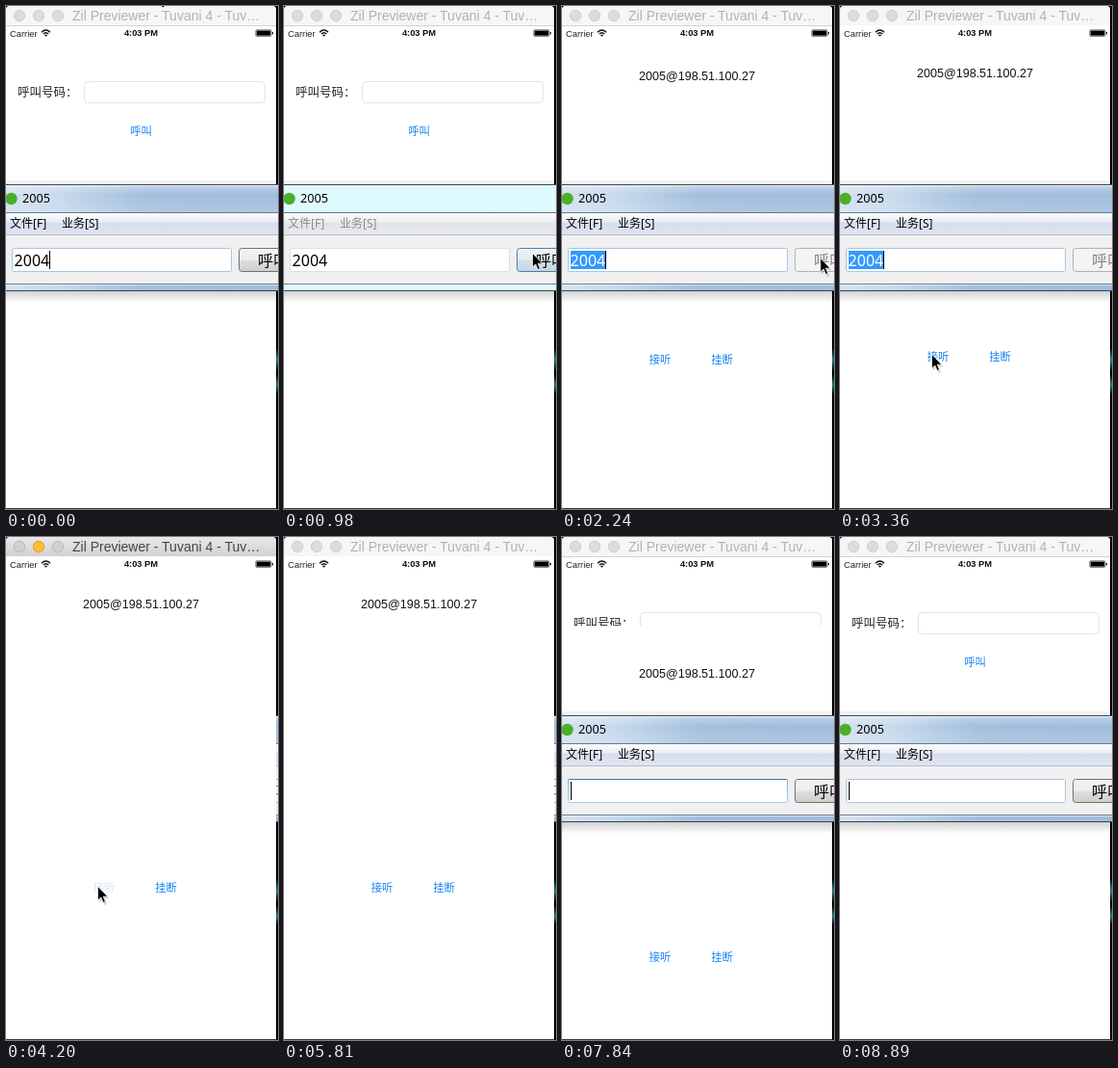
An HTML page for the animation above (9.1 s loop, 283 px wide and 522 px high).

```html
<!DOCTYPE html>
<html lang="zh-CN">
<head>
<meta charset="utf-8">
<title>Call demo</title>
<style>
html, body { margin: 0; width: 100%; height: 100%; overflow: hidden; background: #000; }
svg { display: block; }
text { white-space: pre; }
.la { font-family: "Liberation Sans", Arial, sans-serif; }
.cn { font-family: "Noto Sans CJK SC", "Noto Sans CJK", sans-serif; }
.ui { font-family: "Noto Sans", "Noto Sans CJK SC", "Noto Sans CJK", sans-serif; }
.link { font-size: 11.3px; fill: #1482f2; }
</style>
</head>
<body>
<svg width="283" height="522" viewBox="0 0 283 522">
  <defs>
    <linearGradient id="barOn" x2="0" y2="1"><stop stop-color="#e9e9e9"/><stop offset="1" stop-color="#d0d0d0"/></linearGradient>
    <linearGradient id="aero"><stop stop-color="#d3e2f1"/><stop offset=".2" stop-color="#c6d9ec"/><stop offset=".5" stop-color="#a3bfdd"/><stop offset="1" stop-color="#a0bddc"/></linearGradient>
    <linearGradient id="sheen" x2="0" y2="1"><stop stop-color="#fff" stop-opacity=".35"/><stop offset=".35" stop-color="#fff" stop-opacity="0"/><stop offset="1" stop-color="#fff" stop-opacity=".15"/></linearGradient>
    <linearGradient id="menu" x2="0" y2="1"><stop stop-color="#fcfdfe"/><stop offset=".42" stop-color="#e8edf6"/><stop offset=".45" stop-color="#d5dcec"/><stop offset="1" stop-color="#dfe5f2"/></linearGradient>
    <linearGradient id="menuOff" x2="0" y2="1"><stop stop-color="#fafbfc"/><stop offset=".42" stop-color="#eceef2"/><stop offset=".45" stop-color="#e0e3e9"/><stop offset="1" stop-color="#e8eaee"/></linearGradient>
    <linearGradient id="btn" x2="0" y2="1"><stop stop-color="#f3f3f3"/><stop offset=".5" stop-color="#ebebeb"/><stop offset=".51" stop-color="#dddddd"/><stop offset="1" stop-color="#cfcfcf"/></linearGradient>
    <linearGradient id="btnHot" x2="0" y2="1"><stop stop-color="#eef4f8"/><stop offset=".5" stop-color="#e2ebf1"/><stop offset=".51" stop-color="#d2dfe8"/><stop offset="1" stop-color="#c6d6e2"/></linearGradient>
    <linearGradient id="focus" x2="0" y2="1"><stop stop-color="#3d7bad"/><stop offset=".1" stop-color="#8db6d6"/><stop offset="1" stop-color="#a9cbe5"/></linearGradient>
    <linearGradient id="shade" x2="0" y2="1"><stop stop-color="#000" stop-opacity=".18"/><stop offset="1" stop-color="#000" stop-opacity="0"/></linearGradient>
    <linearGradient id="glow" x2="0" y2="1"><stop stop-color="#000"/><stop offset=".5" stop-color="#2e7f78"/><stop offset="1" stop-color="#000"/></linearGradient>
    <clipPath id="screen"><rect y="20" width="281" height="501"/></clipPath>
    <clipPath id="edge"><rect x="281" width="2" height="522"/></clipPath>
  </defs>

  <rect width="283" height="522"/>
  <rect x="281" y="355" width="2" height="24" fill="url(#glow)"/>
  <rect x="281" y="383" width="2" height="20" fill="url(#glow)"/>

  <g id="sim">
    <path d="M0 521V4Q0 0 4 0H277Q281 0 281 4V521Z" fill="#fff"/>
    <path id="bar" d="M0 21V4Q0 0 4 0H277Q281 0 281 4V21Z"/>
    <rect id="rule" y="20" width="281" height="1"/>
    <g stroke-width="1">
      <circle class="dot" cx="14" cy="10" r="5.7"/>
      <circle class="dot" cx="34" cy="10" r="5.7"/>
      <circle class="dot" cx="54" cy="10" r="5.7"/>
    </g>
    <text id="title" class="la" x="69" y="15" font-size="14">Zil Previewer - Tuvani 4 - Tuv…</text>

    <g clip-path="url(#screen)">
      <text class="cn" x="12" y="94" font-size="12.5" fill="#222">呼叫号码：</text>
      <rect x="81.5" y="78.5" width="188" height="22" rx="4" fill="#fff" stroke="#e3e3e3"/>
      <text class="cn link" x="140.5" y="134" text-anchor="middle">呼叫</text>
      <g id="call">
        <rect y="20" width="281" height="502" fill="#fff"/>
        <text class="la" x="140.5" y="74" font-size="12.55" text-anchor="middle" fill="#111">2005@198.51.100.27</text>
        <text id="answer" class="cn link" x="102" y="368" text-anchor="middle">接听</text>
        <text class="cn link" x="166.5" y="368" text-anchor="middle">挂断</text>
      </g>
    </g>

    <text class="la" x="4" y="31.5" font-size="9.4" fill="#222">Carrier</text>
    <g fill="none" stroke="#111" stroke-width="1.4">
      <path d="M37 27.2Q41.5 22.8 46 27.2M38.8 29Q41.5 26.4 44.2 29"/>
    </g>
    <path d="M40 30.2Q41.5 28.8 43 30.2L41.5 31.8Z" fill="#111"/>
    <text class="la" x="140.5" y="31" font-size="9.3" font-weight="bold" text-anchor="middle" fill="#111">4:03 PM</text>
    <g transform="translate(.5 0)">
      <rect x="259.4" y="24.9" width="16" height="6.4" rx="1" fill="#fff" stroke="#222" stroke-width=".7"/>
      <rect x="260.2" y="25.6" width="14.4" height="5" fill="#000"/>
      <rect x="276.2" y="27" width="1.3" height="2.4" fill="#222"/>
    </g>
  </g>
  <rect y="521" width="281" height="1" fill="#3a3f45"/>

  <g id="win">
    <rect y="296" width="283" height="12" fill="url(#shade)"/>
    <rect y="181" width="283" height="4" fill="#000" opacity=".05"/>
    <rect id="frame" y="185" width="283" height="111"/>
    <rect id="gloss" y="186" width="283" height="28" fill="url(#sheen)"/>
    <rect y="185" width="283" height="1" fill="#3a4550"/>
    <rect y="186" width="283" height="1" fill="#fff" opacity=".7"/>
    <circle cx="5.5" cy="200" r="6.2" fill="#4caf2c"/>
    <text class="ui" x="17" y="204.3" font-size="12.7">2005</text>
    <rect y="214" width="283" height="1" fill="#66798c"/>
    <rect id="menubar" y="215" width="283" height="22"/>
    <rect y="237" width="283" height="1" fill="#b6bccc"/>
    <g id="items" class="ui" font-size="12">
      <text x="4" y="230">文件[F]</text>
      <text x="58" y="230">业务[S]</text>
    </g>
    <rect y="238" width="283" height="50" fill="#f0f0f0"/>
    <rect y="288" width="283" height="1" fill="#6c7f92"/>
    <rect y="289" width="283" height="1" fill="#fff" opacity=".55"/>
    <rect y="295" width="283" height="1" fill="#38434e"/>
    <rect id="field" x="6.5" y="251.5" width="228" height="24" rx="1" fill="#fff"/>
    <rect id="mark" x="9" y="254" width="36" height="19" fill="#3399ff"/>
    <text id="number" class="ui" x="8.6" y="270" font-size="16">2004</text>
    <rect id="caret" y="254" width="1" height="19"/>
    <rect id="button" x="242.5" y="251.5" width="60" height="24" rx="3"/>
    <text id="dial" class="cn" x="262" y="269.5" font-size="16">呼叫</text>
  </g>

  <g id="mouse">
    <path id="dim" d="M1 2V17L4.5 13.8L7 19.5L9.6 18.4L7.2 12.8H12Z" fill="#000" opacity=".18"/>
    <path d="M0 0V14.6L3.3 11.6L5.6 17L8 16L5.7 10.7H10.4Z" fill="#000" stroke="#fff" stroke-width=".8"/>
  </g>
</svg>
<script>
const LOOP = 9100, TICK = 70, HEIGHT = 502;
const el = id => document.getElementById(id);
const set = (id, attrs) => { for (const k in attrs) el(id).setAttribute(k, attrs[k]); };
const show = (id, on) => set(id, { display: on ? "inline" : "none" });
const within = (t, a, b) => t >= a && t < b;
const dots = document.querySelectorAll(".dot");

// time, x, y of the pointer tip; a missing place hides it
const path = [
  [0, 157, -15], [490, 157, -15], [980, 258.5, 256.5], [1120, 268.8, 261.5],
  [2730, 268.8, 261.5], [3360, 95.5, 361.5], [3500, 95.5, 362.5],
  [4270, 95.5, 362.5], [4970, 271, 281], [5040],
  [8190, 279, 150], [8750, 226, -20], [LOOP]
];
const carets = [[0, 210], [1820, 2380], [2940, 3500], [5880, 6370], [6930, 7490], [7700, 8330], [8890, LOOP]];

function pointer(t) {
  const i = path.findLastIndex(p => p[0] <= t);
  const [t0, x0, y0] = path[i], [t1, x1, y1] = path[i + 1];
  if (x0 === undefined) return null;
  if (x1 === undefined) return [x0, y0];
  const p = (t - t0) / (t1 - t0), e = p * p * (3 - 2 * p);
  return [x0 + (x1 - x0) * e, y0 + (y1 - y0) * e];
}

// critically damped spring, from 1 down to 0
const spring = u => u <= 0 ? 1 : (1 + u) * Math.exp(-u);

function slide(t) {
  if (t < 2030 || t > 8050) return HEIGHT;
  if (t < 7840) return t >= 2380 ? 0 : HEIGHT * spring(1.18 + .028 * (t - 2030));
  return HEIGHT * (1 - spring(.663 + .0184 * (t - 7840)));
}

function draw(t) {
  const simOn = within(t, 4060, 5810);
  const behind = within(t, 4060, 5880);
  const faded = within(t, 350, 1820);
  const empty = t >= 7700;
  const focused = within(t, 7700, 8050);
  const picked = within(t, 1820, 7700);
  const off = within(t, 1820, 7840);
  const hot = within(t, 980, 1820);

  set("bar", { fill: simOn ? "url(#barOn)" : "#f6f6f6" });
  set("rule", { fill: simOn ? "#b4b4b4" : "#d3d3d3" });
  set("title", { fill: simOn ? "#454545" : "#b2b2b2" });
  dots.forEach((d, i) => {
    const amber = simOn && i === 1;
    d.setAttribute("fill", amber ? "#fdbe2f" : simOn ? "#d0d0d0" : "#dcdcdc");
    d.setAttribute("stroke", amber ? "#e0a023" : simOn ? "#b9b9b9" : "#d0d0d0");
  });

  const y = slide(t);
  show("call", y < HEIGHT);
  set("call", { transform: `translate(0 ${Math.round(y)})` });
  set("answer", { opacity: within(t, 4130, 4270) ? .2 : 1 });

  set("win", { "clip-path": behind ? "url(#edge)" : "none" });
  set("frame", { fill: faded ? "#dffafe" : "url(#aero)" });
  show("gloss", !faded);
  set("menubar", { fill: faded ? "url(#menuOff)" : "url(#menu)" });
  set("items", { fill: faded ? "#8b8b8b" : "#000" });
  set("field", { stroke: focused ? "url(#focus)" : faded ? "#dcdfe3" : "#a9c6e2" });
  show("mark", picked);
  show("number", !empty);
  set("number", { fill: picked ? "#fff" : "#000" });
  show("caret", carets.some(([a, b]) => within(t, a, b)));
  set("caret", { x: empty ? 9 : 45 });
  set("button", {
    fill: off ? "#f4f4f4" : hot ? "url(#btnHot)" : "url(#btn)",
    stroke: off ? "#adb2b5" : hot ? "#4f7ea6" : "#707070"
  });
  set("dial", { fill: off ? "#838383" : "#000" });

  const at = pointer(t);
  show("mouse", at);
  if (at) set("mouse", { transform: `translate(${at[0].toFixed(1)} ${at[1].toFixed(1)})` });
  show("dim", t >= 1470);
}

const start = performance.now();
function frame() {
  const t = (performance.now() - start) % LOOP;
  draw(Math.floor(t / TICK) * TICK);
  requestAnimationFrame(frame);
}
frame();
</script>
</body>
</html>
```
